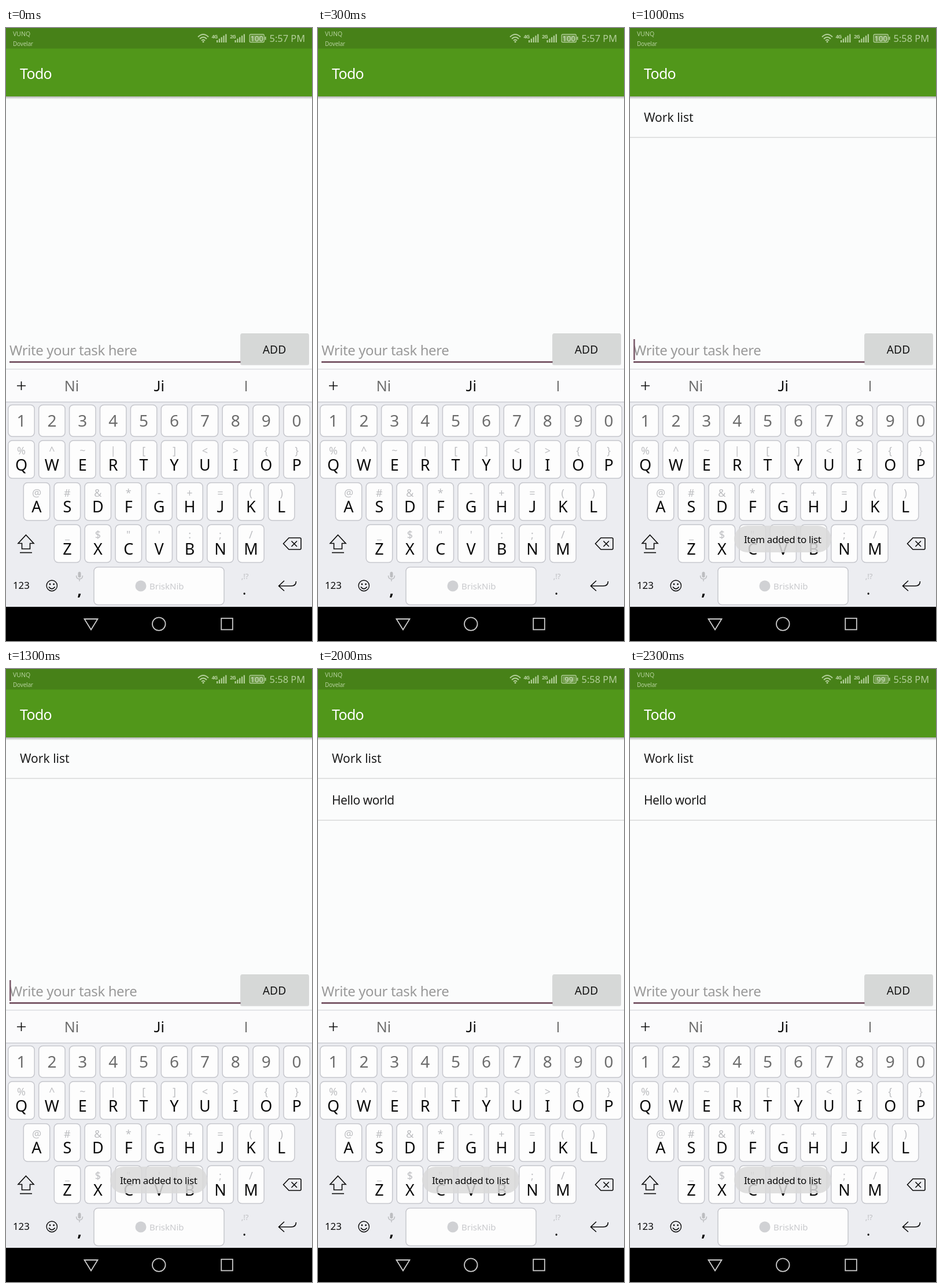
Write an HTML page that moves like this. It is 529 by 1058 pixels and loops after 2.5 s.

```html
<!DOCTYPE html>
<html lang="en">
<head>
<meta charset="utf-8">
<title>Todo</title>
<style>
html, body { margin: 0; height: 100%; overflow: hidden; background: #fbfcfc; }
svg { display: block; width: 100%; height: 100%; font-family: "Noto Sans", "Open Sans", sans-serif; }
text { white-space: pre; }
</style>
</head>
<body>
<svg id="stage" viewBox="0 0 529 1058"></svg>
<script>
const stage = document.getElementById('stage');
const STEP = 500, INK = '#0a0a0a', GREY = '#6c6c6c', PALE = '#bcbdc0', STATUS = '#b4d09b', ACCENT = '#7c5c6b';

const esc = s => s.replace(/&/g, '&amp;').replace(/</g, '&lt;').replace(/>/g, '&gt;');
const text = (x, y, s, size, fill, extra = '') =>
  `<text x="${x}" y="${y}" font-size="${size}" fill="${fill}" ${extra}>${esc(s)}</text>`;
const mid = (x, y, s, size, fill, extra = '') => text(x, y, s, size, fill, `text-anchor="middle" ${extra}`);
const track = n => `letter-spacing="${n}"`;
const rect = (x, y, w, h, fill, extra = '') =>
  `<rect x="${x}" y="${y}" width="${w}" height="${h}" fill="${fill}" ${extra}/>`;
const line = (d, color = INK, width = 1.6) =>
  `<path d="${d}" fill="none" stroke="${color}" stroke-width="${width}"/>`;
const circle = (x, y, r, fill, extra = '') => `<circle cx="${x}" cy="${y}" r="${r}" fill="${fill}" ${extra}/>`;
const key = (x, y, w, h) => rect(x, y, w, h, '#fdfdfd', 'rx="7" stroke="#c6c7cd" stroke-width="1.5"');
const MEDIUM = 'font-weight="500"';
const MONO = 'font-family="Noto Sans Mono, monospace"';

const empty = { upper: true, words: ['Ni', 'Ji', 'I'], sizes: [25, 25, 25], items: 0, battery: '100', time: '5:58 PM' };
const added = { ...empty, toast: true };
const states = [
  { ...empty, time: '5:57 PM' },
  { ...empty, upper: false, input: 'Work list', gap: 0, mark: [72, 104], caret: 104.5,
    words: ['lists', 'list', 'listed'], sizes: [25.4, 25, 24.5] },
  { ...added, items: 1, caret: 7.3 },
  { ...empty, upper: false, items: 1, input: 'Hello world', gap: -.7, mark: [68, 127],
    words: ['worlds', 'world', 'worldwide'], sizes: [23.5, 23.5, 18.2] },
  { ...added, items: 2, battery: '99' }
];

const signal = (x, label) => text(x, 18, label, 9, STATUS, 'font-weight="700" letter-spacing="-.8"') +
  [0, 1, 2, 3, 4].map(i => rect(x + 8.5 + i * 3.8, 21 - i * 2.6, 2.2, 4 + i * 2.6, STATUS)).join('');

function header(s) {
  return rect(0, 0, 529, 1058, '#fbfcfc') +
    rect(0, 118, 529, 5, 'url(#shade)') +
    rect(0, 35, 529, 83, '#51971a') + rect(0, 0, 529, 35.5, '#478118') +
    text(12, 14, 'VUNQ', 10.5, STATUS) + text(12, 30.5, 'Dovelar', 10, STATUS, track(-.2)) +
    line('M332 15.5Q341 6.5 350 15.5M335 18.7Q341 12.7 347 18.7M338 21.7Q341 18.7 344 21.7', STATUS, 2) +
    circle(341, 23.7, 1.5, STATUS) +
    signal(355.5, '4G') + signal(387, '2G') +
    rect(421.2, 11, 25, 13.5, 'none', `rx="2" stroke="${STATUS}" stroke-width="1.3"`) +
    rect(423, 12.8, 21.4, 9.9, '#79a355') + rect(447.5, 15, 2, 5.5, STATUS) +
    mid(433.7, 22.5, s.battery, 13, '#d3e3c6', MEDIUM) +
    text(455.5, 24, s.time, 16.4, STATUS) +
    text(24, 87.5, 'Todo', 25, '#fff', `${MEDIUM} letter-spacing="-.7"`);
}

function form(s) {
  const items = [['Work list', 0], ['Hello world', -.45]].slice(0, s.items).map(([label, gap], i) =>
    text(24, 162 + i * 72, label, 21, '#1c1c1c', track(gap)) +
    rect(0, 188 + i * 72.3, 529, 1.5, '#d8d9d9')).join('');
  const field = s.input
    ? text(6, 565, s.input, 24, '#1c1c1c', track(s.gap)) + line(`M${s.mark[0]} 568.8H${s.mark[1]}`, '#1c1c1c', 1.5)
    : text(6, 565, 'Write your task here', 24, '#999', track(-.4));
  return items + field + rect(6, 575, 401, 3, ACCENT) +
    (s.caret ? rect(s.caret - 1.3, 537, 2.6, 36, ACCENT) : '') +
    rect(405, 528, 119, 54, '#0002', 'rx="3"') + rect(405.5, 527, 118, 53, '#d6d8d7', 'rx="2.5"') +
    mid(464, 561.5, 'ADD', 19.2, '#151515');
}

function suggestions({ words, sizes }) {
  return rect(0, 588, 529, 57, '#fbfbfc') + rect(0, 588, 529, 1.5, '#dcdde1') +
    line('M19 617.5H34M26.5 610V625') +
    words.map((w, i) => {
      const x = 113.5 + i * 150.7, fill = i == 1 ? INK : GREY;
      if (w == 'Ji') return text(253.5, 627, 'J', 25, fill, MONO) + text(267.5, 627, 'i', 25, fill, MEDIUM);
      const style = w == 'I' ? 'font-family="Open Sans, sans-serif"' : i == 1 ? MEDIUM : '';
      return mid(x, sizes[i] < 20 ? 625 : 627, w, sizes[i], fill, style);
    }).join('');
}

const rows = [
  ['qwertyuiop', '%^~|[]<>{}', 26.5, 712],
  ['asdfghjkl', '@#&*-+=()', 53, 784.7],
  ['zxcvbnm', '_$"\':;/', 106, 857.3]
];

function keyboard(s) {
  let out = rect(0, 645, 529, 354, '#ecedf1') + rect(0, 644.8, 529, 1.5, '#c9cad0');
  [...'1234567890'].forEach((n, i) => {
    const x = 26.5 + i * 52.9;
    out += key(x - 22.7, 650.5, 45.4, 54.5) + mid(x, 688, n, 28, GREY);
  });
  for (const [letters, hints, start, y] of rows)
    [...letters].forEach((c, i) => {
      const x = start + i * 52.9, label = s.upper ? c.toUpperCase() : c;
      out += key(x - 22.7, y, 45.4, 65.3) + mid(x, y + 24, hints[i], 18, PALE) +
        mid(x, y + (s.upper ? 51.5 : 52), label, 27, INK, MEDIUM + (label == 'J' ? ' ' + MONO : ''));
    });
  return out +
    line('M34.5 875L48 889.5H41.5V899H27.5V889.5H21Z') + (s.upper ? line('M24 905.5H45') : '') +
    line('M479.5 890L489 880H508Q510 880 510 882V898Q510 900 508 900H489ZM493.5 885.5L503 895M503 885.5L493.5 895') +
    text(12, 968, '123', 16.8, INK, MEDIUM) +
    circle(79.3, 962.5, 9.2, 'none', `stroke="${INK}" stroke-width="1.4"`) +
    circle(76, 960, 1.4, INK) + circle(82.6, 960, 1.4, INK) + line('M74 964.5Q79.3 971.5 84.6 964.5', INK, 1.4) +
    rect(124.5, 938.5, 5, 10, PALE, 'rx="2.5"') + line('M121.5 945Q121.5 951 127 951T132.5 945M127 951V955', PALE, 1.4) +
    mid(127, 980, ',', 27, INK, 'font-weight="700"') +
    key(152, 930.5, 225, 65) + circle(233, 963, 9.5, '#d0d1d4') +
    text(248, 969, 'BriskNib', 15, '#c8c9cc', MEDIUM) +
    mid(413, 951, ',!?', 13, PALE) + mid(412, 978, '.', 25, INK, MEDIUM) +
    line('M501.5 955Q501.5 963 493 963H472M481 954L471.5 963L481 971.5');
}

const toast = () => rect(180, 859, 168, 46, '#dadada', 'rx="23" opacity=".86"') +
  text(197, 889, 'Item added to list', 17, INK, track(-.4));

const navigation = () => rect(0, 999, 529, 59, '#000') +
  line('M135.5 1020H158.5L147 1038.5Z', '#ccc', 1.8) +
  circle(264.3, 1028.6, 11.3, 'none', 'stroke="#ccc" stroke-width="1.8"') +
  rect(372.2, 1018.8, 19.6, 19.6, 'none', 'stroke="#ccc" stroke-width="1.8"');

const shade = `<defs><linearGradient id="shade" x2="0" y2="1">
  <stop stop-color="#000" stop-opacity=".3"/><stop offset="1" stop-opacity="0"/></linearGradient></defs>`;

let shown = -1;
function frame() {
  const i = Math.floor(performance.now() / STEP) % states.length;
  if (i != shown) {
    const s = states[shown = i];
    stage.innerHTML = shade + header(s) + form(s) + suggestions(s) + keyboard(s) + (s.toast ? toast() : '') + navigation();
  }
  requestAnimationFrame(frame);
}
frame();
</script>
</body>
</html>
```
